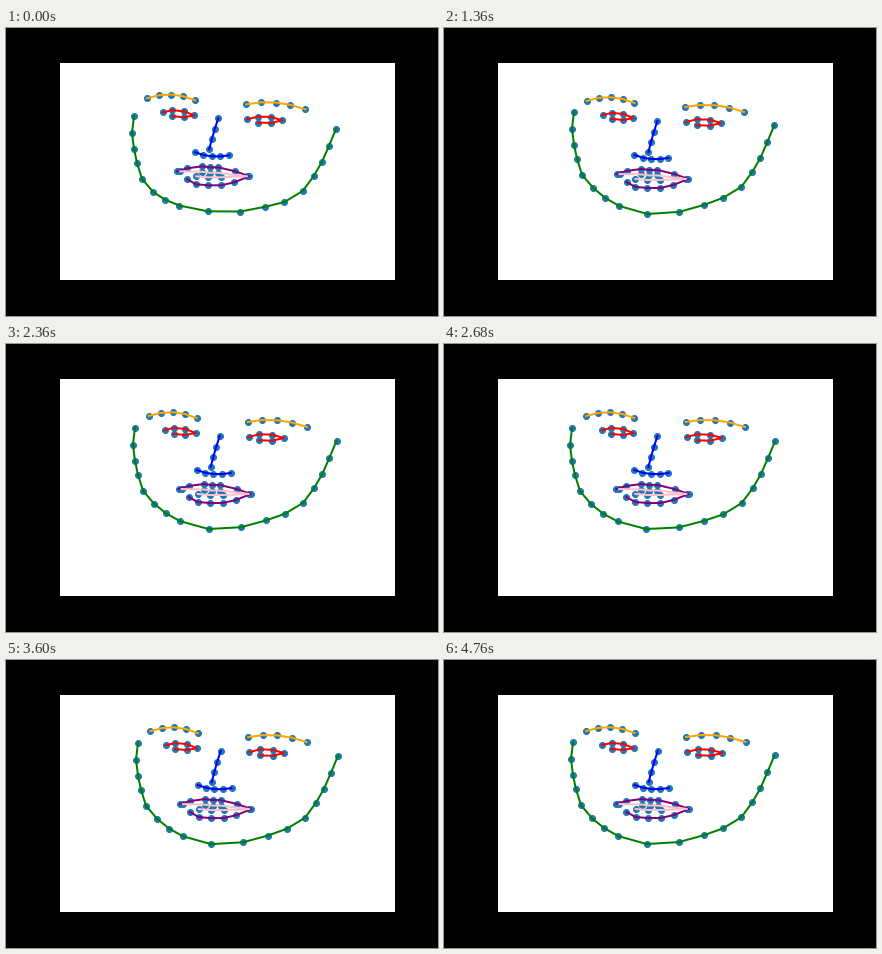
A matplotlib script that plays this animation: 432 by 288 pixels, repeating every 4800 ms.

```python
import numpy as np
import matplotlib.pyplot as plt
from matplotlib.animation import FuncAnimation

W, H, DPI = 432, 288, 72
FRAMES, INTERVAL = 120, 40
LEFT, RIGHT = 130, 330  # sides of the resting face, in stage pixels


def arc(start, bend, end, n):
    """n evenly spaced points on a quadratic curve."""
    t = np.linspace(0, 1, n)[:, None]
    start, bend, end = map(np.array, (start, bend, end))
    return (1 - t) ** 2 * start + 2 * t * (1 - t) * bend + t ** 2 * end


def eye(x, y, width, drop):
    """Six points: corner, upper lid, corner, lower lid."""
    u = np.array([0, .3, .67, 1, .67, .3])
    lid = np.array([0, -3, -3, 0, 3, 3])
    return np.column_stack([x + u * width, y + u * drop + lid])


def inner_mouth(lips):
    upper = lips[2:5] + (0, 5.5)
    lower = lips[8:11] - (0, 8)
    return np.vstack([lips[0] + (3, 0), upper, lips[6] - (2, 0), lower])


JAW = np.array([(130, 83), (128, 100), (130, 116), (133, 130), (138, 146),
                (149, 159), (161, 169), (175, 177), (203, 185), (235, 183),
                (260, 176), (279, 169), (297, 158), (308, 143), (316, 129),
                (323, 113), (330, 96)], float)
LIPS = np.array([(173, 145), (183, 142), (198, 140), (206, 141), (214, 141),
                 (231, 145), (245, 150), (230, 156), (217, 159), (204, 159),
                 (192, 158), (183, 153)], float)
FEATURES = [
    ("orange", arc((143, 72), (167, 63.5), (191, 74), 5)),
    ("orange", arc((242, 78), (271, 72), (301, 83), 5)),
    ("blue", arc((214, 92), (208.5, 108.5), (205, 123), 4)),
    ("blue", arc((191, 126), (207, 132.5), (225, 129), 5)),
    ("red", eye(159, 86, 31, 3)),
    ("red", eye(243, 93, 35, 1)),
    ("purple", LIPS),
    ("pink", inner_mouth(LIPS)),
]

# Head sway: time in ms, then (left dx, right dx, dy) of the jaw and the features
SWAY = np.array([
    (0, -2, 0, 5, -2, -1.5, -1.7),
    (680, 0, 1, 1.5, -.6, -2.2, 2),
    (2000, 0, 0, 0, 0, 0, 0),
    (2680, -2, 1, 1.3, -1, 0, 0),
    (3400, 2, 4.5, -.5, 2, 2, -.8),
    (3600, 2, 2, -.3, 1.5, -.6, -.9),
    (4120, -2, 1, .3, -.4, 2.4, -.1),
    (4760, -1, .5, -.7, -1, .8, -1),
])

# The jaw's own vertical motion fades out towards the chin
FADE = np.minimum(abs(np.arange(len(JAW)) - 8) / 3, 1)


def shifted(pts, left, right, dy):
    dx = np.interp(pts[:, 0], [LEFT, RIGHT], [left, right])
    return pts + np.column_stack([dx, np.broadcast_to(dy, dx.shape)])


def face(ms):
    jaw_l, jaw_r, jaw_y, left, right, dy = (
        np.interp(ms, SWAY[:, 0], column) for column in SWAY.T[1:])
    jaw = shifted(JAW, jaw_l, jaw_r, dy + (jaw_y - dy) * FADE)
    return [jaw] + [shifted(pts, left, right, dy) for _, pts in FEATURES]


fig = plt.figure(figsize=(W / DPI, H / DPI), dpi=DPI, facecolor="black")
ax = fig.add_axes([54 / W, 36 / H, 335 / W, 217 / H], facecolor="white")
ax.set(xlim=(54, 389), ylim=(252, 35), xticks=[], yticks=[])
ax.spines[:].set_visible(False)

dots = ax.scatter([], [], s=36, color="#1f77b4", linewidth=1, zorder=1)
colors = ["green"] + [color for color, _ in FEATURES]
lines = [ax.plot([], [], color=color, lw=2, zorder=2)[0] for color in colors]


def draw(frame):
    parts = face(frame * INTERVAL)
    for line, pts in zip(lines, parts):
        line.set_data(*pts.T)
    dots.set_offsets(np.vstack(parts))
    return [dots, *lines]


anim = FuncAnimation(fig, draw, frames=FRAMES, interval=INTERVAL, repeat=True,
                     repeat_delay=0)
plt.show()
```
